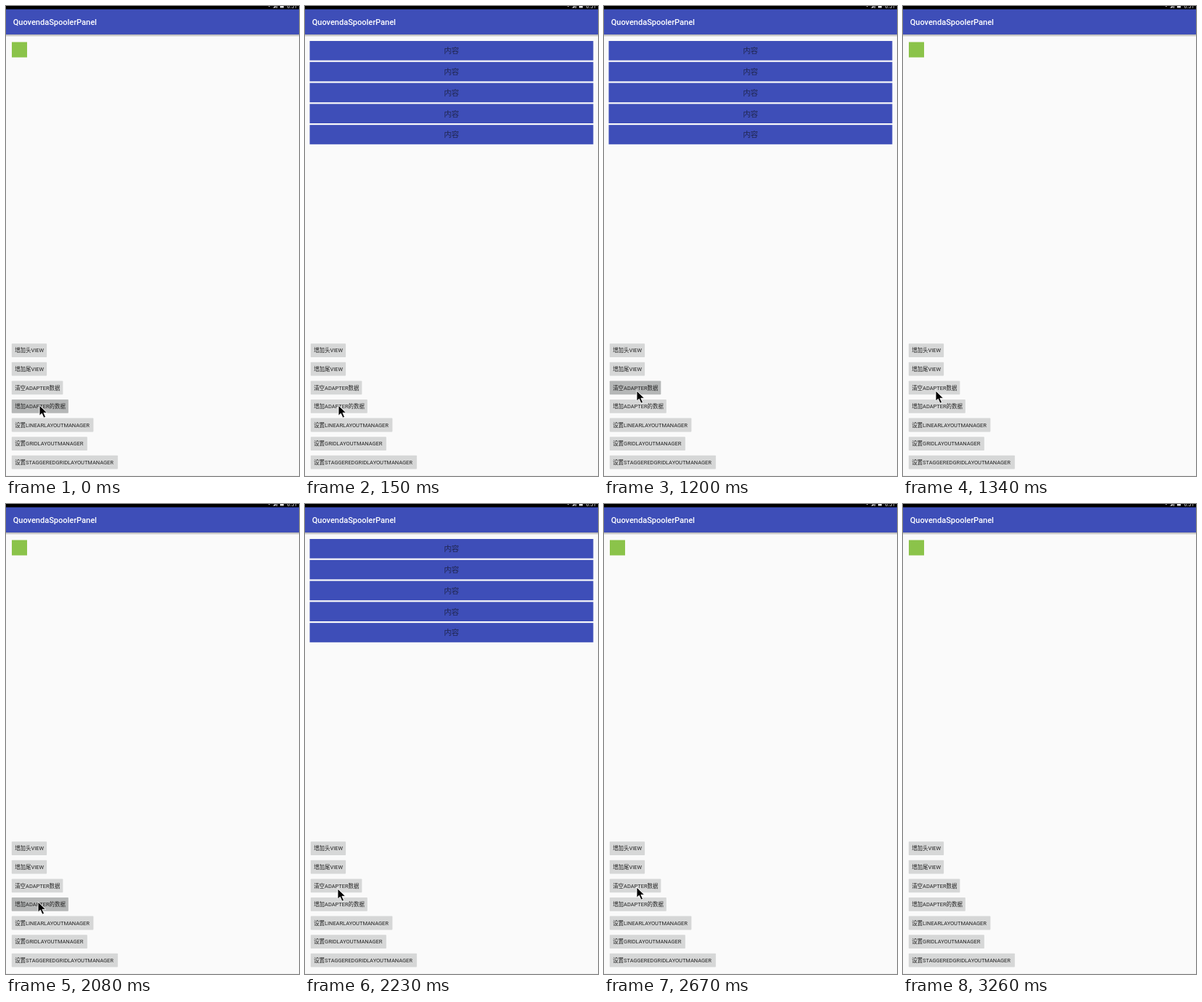
An HTML page for the animation above (3770 ms loop, 403 by 645 pixels).

```html
<!DOCTYPE html>
<html lang="zh-CN">
<head>
<meta charset="utf-8">
<title>列表演示</title>
<style>
  html, body { margin: 0; width: 100%; height: 100%; overflow: hidden; background: #fafafa; }
  svg { display: block; width: 403px; height: 645px; }
  text { font-family: Roboto, "Noto Sans CJK SC", "Noto Sans CJK", sans-serif; }
</style>
</head>
<body>
<svg id="stage" viewBox="0 0 403 645">
  <defs>
    <linearGradient id="shade" x2="0" y2="1">
      <stop stop-color="#000" stop-opacity=".32"/>
      <stop offset="1" stop-color="#000" stop-opacity="0"/>
    </linearGradient>
    <clipPath id="strip"><rect width="403" height="4"/></clipPath>
  </defs>
  <rect width="403" height="645" fill="#fafafa"/>
  <rect y="644" width="403" height="1" fill="#f0f0f0"/>
  <rect y="39" width="403" height="3.5" fill="url(#shade)"/>
  <rect y="4" width="403" height="35" fill="#3e4eb8"/>
  <rect width="403" height="4.5" fill="#000"/>
  <g clip-path="url(#strip)" fill="#ddd">
    <path d="M361 0h2l-1 1.5zM367 2.5l4-3v3zM372 0h1v3h-1zM377 0h5v2.5h-5z"/>
    <text x="386.5" y="2.6" font-size="7.3">6:51</text>
  </g>
  <text x="9.7" y="25.6" font-size="11" font-weight="500" fill="#fff">QuovendaSpoolerPanel</text>
  <rect id="icon" x="8" y="49.5" width="21" height="21" fill="#8bc34a"/>
  <g id="list"></g>
  <g id="buttons"></g>
  <path id="cursor" d="M1 1V15.2L4.3 12.2L7 18.2L9.5 17.1L6.9 11.3H11.6Z"
        fill="#000" stroke="#fff" stroke-width=".9"/>
</svg>
<script>
const LOOP = 3770;
const $ = id => document.getElementById(id);

function add(parent, tag, attrs, label) {
  const el = document.createElementNS("http://www.w3.org/2000/svg", tag);
  for (const key in attrs) el.setAttribute(key, attrs[key]);
  if (label) el.textContent = label;
  return parent.appendChild(el);
}

for (let i = 0; i < 5; i++) {
  const y = 48 + i * 28.8;
  add($("list"), "rect", { x: 6.5, y, width: 390, height: 26.6, fill: "#3e4eb8" });
  add($("list"), "text", {
    x: 201.6, y: y + 17.2, "font-size": 10.4, "text-anchor": "middle", fill: "#20264f"
  }, "内容");
}

const buttons = [
  ["增加头VIEW", 48.3],
  ["增加尾VIEW", 48.3],
  ["清空ADAPTER数据", 70.5],
  ["增加ADAPTER的数据", 78],
  ["设置LINEARLAYOUTMANAGER", 112.5],
  ["设置GRIDLAYOUTMANAGER", 104],
  ["设置STAGGEREDGRIDLAYOUTMANAGER", 146]
].map(([label, width], i) => {
  const y = 463.2 + i * 25.6;
  const box = add($("buttons"), "rect", { x: 7.8, y, width, height: 18.8, rx: 0.8 });
  add($("buttons"), "text", { x: 12.2, y: y + 12.1, "font-size": 7.45, fill: "#222" }, label);
  return box;
});

// Start time, x, y of the pointer
const moves = [
  [0, 45, 547], [450, 45, 543], [600, 44, 529], [750, 44, 527],
  [1490, 43, 533], [1640, 44, 545], [1790, 43, 547], [2080, 43, 545],
  [2230, 44, 527], [2380, 44, 525], [2810, 44, 536], [2960, 145, 580],
  [3110, 261, 639], [3260, 403, 645]
];
// Start time, list filled, pressed button
const states = [
  [0, false, 3], [150, true, -1], [1200, true, 2], [1340, false, -1],
  [2080, false, 3], [2230, true, -1], [2530, true, 2], [2670, false, -1]
];

const at = (steps, t) => steps.findLast(step => step[0] <= t);

function draw(t) {
  const [, x, y] = at(moves, t);
  const [, filled, pressed] = at(states, t);
  $("cursor").setAttribute("transform", `translate(${x} ${y})`);
  $("list").setAttribute("visibility", filled ? "visible" : "hidden");
  $("icon").setAttribute("visibility", filled ? "hidden" : "visible");
  buttons.forEach((box, i) => box.setAttribute("fill", i === pressed ? "#b5b7b7" : "#d6d7d7"));
}

const start = performance.now();
function tick() {
  draw((performance.now() - start) % LOOP);
  requestAnimationFrame(tick);
}
tick();
</script>
</body>
</html>
```
